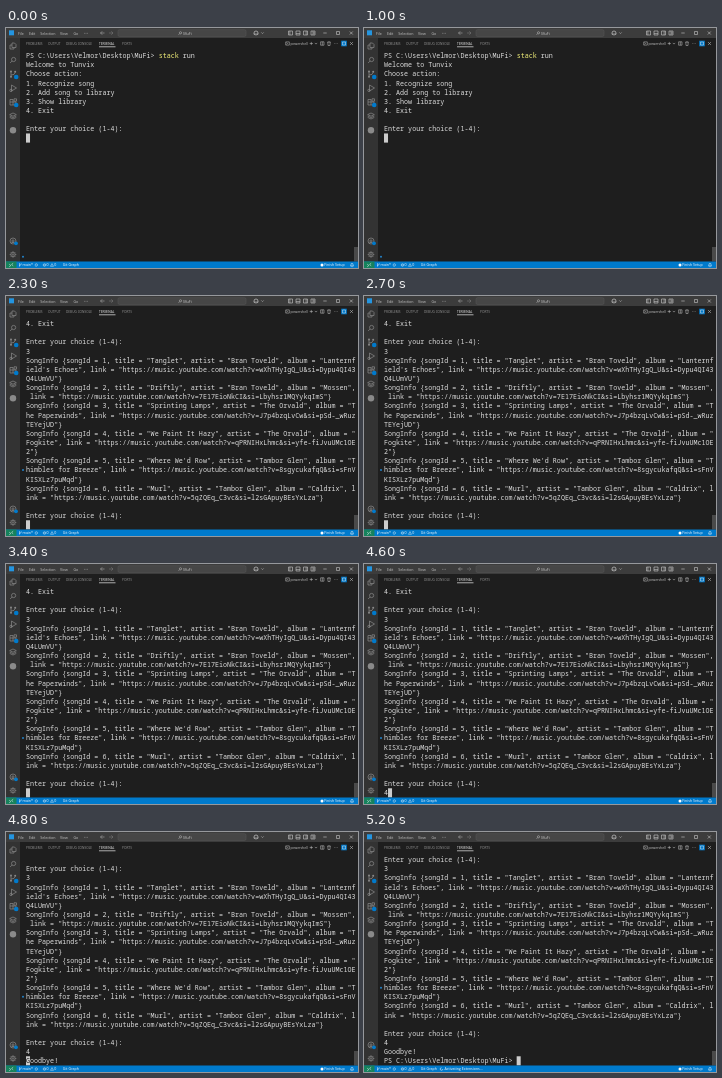
An HTML page with a canvas that plays this animation: 352 px wide and 240 px high, repeating every 5.3 s.

```html
<!DOCTYPE html>
<html lang="en">
<head>
<meta charset="utf-8">
<title>Terminal session</title>
<style>
html, body { margin: 0; width: 100%; height: 100%; overflow: hidden; background: #1e1e1e; }
canvas { display: block; width: 352px; height: 240px; }
</style>
</head>
<body>
<canvas id="stage"></canvas>
<script>
const W = 352, H = 240, LOOP = 5300;
const COLS = 82, ROWS = 23, CELL = 4.02, LINE = 9.14, LEFT = 20, TOP = 23.2;
const MONO = '6.7px "Noto Sans Mono", "DejaVu Sans Mono", monospace';
const SANS = '"Open Sans", "Noto Sans", sans-serif';
const BG = '#1e1e1e', TEXT = '#dcdcdc', DIM = '#8a8a8a', LIGHT = '#c8c8c8', BLUE = '#007acc';

const canvas = document.getElementById('stage');
const ctx = canvas.getContext('2d');
const dpr = window.devicePixelRatio || 1;
canvas.width = W * dpr;
canvas.height = H * dpr;

// Terminal content
const PROMPT = 'PS C:\\Users\\Velmor\\Desktop\\MuFi> ';
const ASK = 'Enter your choice (1-4):';
const MENU = [PROMPT + 'stack run', 'Welcome to Tunvix', 'Choose action:', '1. Recognize song',
  '2. Add song to library', '3. Show library', '4. Exit', '', ASK];
const SONGS = [
  ['Tanglet', 'Bran Toveld', "Lanternfield's Echoes", 'wXhTHyIgQ_U', 'Dypu4QI43Q4LUmVU'],
  ['Driftly', 'Bran Toveld', 'Mossen', '7E17EioNkCI', 'Lbyhsr1MQYykqImS'],
  ['Sprinting Lamps', 'The Orvald', 'The Paperwinds', 'J7p4bzqLvCw', 'pSd-_wRuzTEYejUD'],
  ['We Paint It Hazy', 'The Orvald', 'Fogkite', 'qPRNIHxLhmc', 'yfe-fiJvuUMc1OE2'],
  ["Where We'd Row", 'Tambor Glen', 'Thimbles for Breeze', '8sgycukafqQ', 'sFnVKISXLz7puMqd'],
  ['Murl', 'Tambor Glen', 'Caldrix', '5qZQEq_C3vc', 'l2sGApuyBEsYxLza']
].map(([title, artist, album, id, si], i) =>
  `SongInfo {songId = ${i + 1}, title = "${title}", artist = "${artist}", album = "${album}", ` +
  `link = "https://music.youtube.com/watch?v=${id}&si=${si}"}`);

const wrap = s => s.match(new RegExp(`.{1,${COLS}}`, 'g')) || [''];
const LISTED = [...MENU, '3', ...SONGS.flatMap(wrap), '', ASK];

// Each step: start time, lines, cursor column on the last line
const STEPS = [
  [0, [...MENU, ''], 0],
  [1900, [...MENU, '3'], 1],
  [2300, [...LISTED, ''], 0],
  [4400, [...LISTED, '4'], 1],
  [4700, [...LISTED, '4', 'Goodbye!'], 0],
  [4900, [...LISTED, '4', 'Goodbye!', PROMPT], PROMPT.length]
];
const ACTIVATE_AT = 5000, MARK_ROW = 22;

// Drawing helpers
function rect(x, y, w, h, color) {
  ctx.fillStyle = color;
  ctx.fillRect(x, y, w, h);
}

function disc(x, y, r, color) {
  ctx.fillStyle = color;
  ctx.beginPath();
  ctx.arc(x, y, r, 0, 7);
  ctx.fill();
}

function stroke(path, x, y, color = DIM, width = 0.7) {
  ctx.save();
  ctx.translate(x, y);
  ctx.strokeStyle = color;
  ctx.lineWidth = width;
  ctx.stroke(new Path2D(path));
  ctx.restore();
}

function label(s, x, y, size, color) {
  ctx.font = `${size}px ${SANS}`;
  ctx.fillStyle = color;
  ctx.fillText(s, x, y);
}

function labels(items, y, size, color) {
  for (const [s, x] of items) label(s, x, y, size, color);
}

function mono(s, row, color, col = 0) {
  ctx.font = MONO;
  ctx.fillStyle = color;
  [...s].forEach((c, i) => {
    if (c !== ' ') ctx.fillText(c, LEFT + (col + i) * CELL, TOP + row * LINE + 7);
  });
}

function dots(x, y, color) {
  for (let i = -1; i < 2; i++) disc(x + i * 1.3, y, 0.35, color);
}

const ring = r => `M${r} 0A${r} ${r} 0 1 1 ${-r} 0A${r} ${r} 0 1 1 ${r} 0`;
const CROSS = 'M-1.5-1.5L1.5 1.5M1.5-1.5L-1.5 1.5';
const DOWN = 'M-1.2-.6L0 .6L1.2-.6';
const BOX = 'M-2-2H2V2H-2Z';

function titleBar() {
  rect(0, 0, W, 10, '#3c3c3c');
  rect(3, 2.3, 5, 5, '#2495e0');
  labels([['File', 12], ['Edit', 23], ['Selection', 34.3], ['View', 54], ['Go', 67.5]], 6.5, 3.6, LIGHT);
  dots(80, 5.2, LIGHT);
  stroke('M2 0H-2M-.3-1.7L-2 0L-.3 1.7', 96.5, 5, '#aaa', 0.6);
  stroke('M-2 0H2M.3-1.7L2 0L.3 1.7', 105, 5, '#777', 0.6);
  ctx.fillStyle = '#464646';
  ctx.strokeStyle = '#585858';
  ctx.lineWidth = 0.5;
  ctx.beginPath();
  ctx.roundRect(112, 1.7, 128, 6.7, 1.5);
  ctx.fill();
  ctx.stroke();
  stroke(ring(1.1) + 'M-.8 .8L-2 2', 174.5, 4.8, LIGHT, 0.5);
  label('MuFi', 177.2, 6.5, 3.7, LIGHT);
  stroke('M-2 1.3V0Q-2-2 0-2Q2-2 2 0V1.3Q0 2.6-2 1.3M-1 .2V1M1 .2V1', 250, 5, LIGHT);
  stroke(DOWN, 256.5, 5, LIGHT, 0.5);
  for (const [x, part] of [[284.5, 'M-.6-2V2'], [292, 'M-2 .6H2'], [299.5, 'M.6-2V2'], [307, 'M0-2V2M0 0H2']])
    stroke(BOX + part, x, 5, LIGHT, 0.6);
  stroke('M-1.7 0H1.7', 319, 5, LIGHT, 0.6);
  stroke('M-1.5-1.5H1.5V1.5H-1.5Z', 332, 5, LIGHT, 0.6);
  stroke(CROSS, 345.3, 5, LIGHT, 0.6);
}

function activityBar() {
  rect(0, 10, 14, 224, '#333333');
  stroke('M-1-3H1.5L3-1.5V1.5H-1ZM-1-1H-3V3H1V1.5', 7, 18);
  stroke(ring(2.1) + 'M-1.5 1.5L-3.5 3.5', 7.6, 31.5);
  stroke('M-2-2V2M-2 1Q2 1 2-1.5', 7, 46);
  disc(5, 43.4, 1, DIM);
  disc(5, 48.7, 1, DIM);
  disc(9.2, 43.8, 1, DIM);
  disc(10.2, 49, 2.3, BLUE);
  stroke('M-1.5-3L3.5 0L-1.5 3Z', 7, 60);
  stroke(ring(1.2), 5, 62.4);
  stroke('M-3-2.5H0V3H-3ZM-3 0H3V3H0M1-3.2H3.5V-.8H1Z', 7, 74);
  disc(10.2, 77, 2.3, BLUE);
  stroke('M0-3L3.3-1.4L0 .2L-3.3-1.4ZM-3.3 0L0 1.6L3.3 0M-3.3 1.4L0 3L3.3 1.4', 7, 88);
  disc(7, 102.3, 3.2, DIM);
  stroke(ring(3) + ring(1.1) + 'M-2 2.2Q0 .3 2 2.2', 7, 213);
  disc(10, 215.3, 1.9, BLUE);
  stroke(ring(2.2) + ring(0.8), 7, 226.5);
  stroke('M0-3.3V-2.2M0 3.3V2.2M-3.3 0H-2.2M3.3 0H2.2M-2.3-2.3L-1.6-1.6M2.3 2.3L1.6 1.6M-2.3 2.3L-1.6 1.6M2.3-2.3L1.6-1.6', 7, 226.5);
}

function panelHeader() {
  const y = 15.5;
  labels([['PROBLEMS', 20], ['OUTPUT', 42], ['DEBUG CONSOLE', 60], ['PORTS', 116]], 16.7, 3.2, '#999');
  label('TERMINAL', 93, 16.7, 3.2, '#eee');
  rect(93, 18.5, 16.5, 0.7, '#e7e7e7');
  stroke('M-1.8-1.6H1.8V1.6H-1.8ZM-1-.8L0 0L-1 .8', 281.5, y, LIGHT, 0.5);
  label('powershell', 284.5, 16.7, 3.4, LIGHT);
  stroke('M-1.6 0H1.6M0-1.6V1.6', 305.3, y, LIGHT, 0.5);
  stroke(DOWN, 310, y, LIGHT, 0.5);
  stroke('M-1.7-1.7H1.7V1.7H-1.7ZM0-1.7V1.7', 316.3, y, LIGHT, 0.5);
  stroke('M-1.8-1.3H1.8M-1.2-1.3L-1 2H1L1.2-1.3M-.5-2H.5', 323, y, LIGHT, 0.5);
  dots(330, y, LIGHT);
  rect(335.2, 12.7, 5.6, 5.6, BLUE);
  stroke('M-1.5-1.5H1.5V1.5H-1.5Z', 338, y, '#e0e0e0', 0.5);
  stroke(CROSS, 345.5, y, LIGHT, 0.5);
}

function statusBar(t) {
  const white = '#ffffff', size = 3.6, y = 238.3;
  rect(0, 233.5, W, 6.5, BLUE);
  rect(0, 233.5, 10.5, 6.5, '#16825d');
  stroke('M-2-.8L-.4 .5L-2 1.8M2-1.8L.4-.5L2 .8', 5.2, 237, white, 0.5);
  stroke('M-.8-1.6V1.8M-.8 .7Q1 .7 1-1.4', 14.3, 236.8, white, 0.5);
  label('main*', 16.6, y, size, white);
  stroke('M-1.3 .4A1.4 1.4 0 0 1 1.2-.6M1.3-.4A1.4 1.4 0 0 1-1.2 .6', 30.3, 237, white, 0.5);
  stroke(ring(1.3) + 'M-.6-.6L.6 .6M.6-.6L-.6 .6', 38.5, 237, white, 0.4);
  label('0', 40.6, y, size, white);
  stroke('M0-1.4L1.5 1.3H-1.5Z', 46, 237, white, 0.4);
  label('0', 48.3, y, size, white);
  label('Git Graph', 56.8, y, size, white);
  if (t >= ACTIVATE_AT) {
    stroke('M1.3 0A1.3 1.3 0 1 1 0-1.3', 77.5, 237, white, 0.5);
    label('Activating Extensions...', 80.5, y, size, white);
  }
  disc(316, 237, 1.5, white);
  label('Finish Setup', 318.3, y, size, white);
  stroke('M-1.6 1H1.6L1 .2V-.6Q1-1.6 0-1.6Q-1-1.6-1-.6V.2ZM-.4 1.7H.4', 346, 237, white, 0.5);
}

function terminal(t) {
  const [, lines, col] = STEPS.findLast(step => t >= step[0]);
  const scroll = Math.max(0, lines.length - ROWS);
  lines.slice(scroll).forEach((line, row) => mono(line, row, TEXT));
  if (!scroll) {
    rect(LEFT + PROMPT.length * CELL, TOP, 5 * CELL, LINE, BG);
    mono('stack', 0, '#f0ee78', PROMPT.length);
  }
  const row = lines.length - 1 - scroll;
  rect(LEFT + col * CELL, TOP + row * LINE, CELL, LINE, '#cccccc');
  const under = lines[lines.length - 1][col];
  if (under) mono(under, row, BG, col);
  disc(17, TOP + (MARK_ROW - scroll + 0.5) * LINE, 1, '#2382c8');
  rect(348, 219, 4, 14.5, '#4a4a4a');
}

function draw(now) {
  const t = now % LOOP;
  ctx.setTransform(dpr, 0, 0, dpr, 0, 0);
  rect(0, 0, W, H, BG);
  terminal(t);
  titleBar();
  activityBar();
  panelHeader();
  statusBar(t);
}

const start = performance.now();
function tick() {
  draw(performance.now() - start);
  requestAnimationFrame(tick);
}
tick();
</script>
</body>
</html>
```
